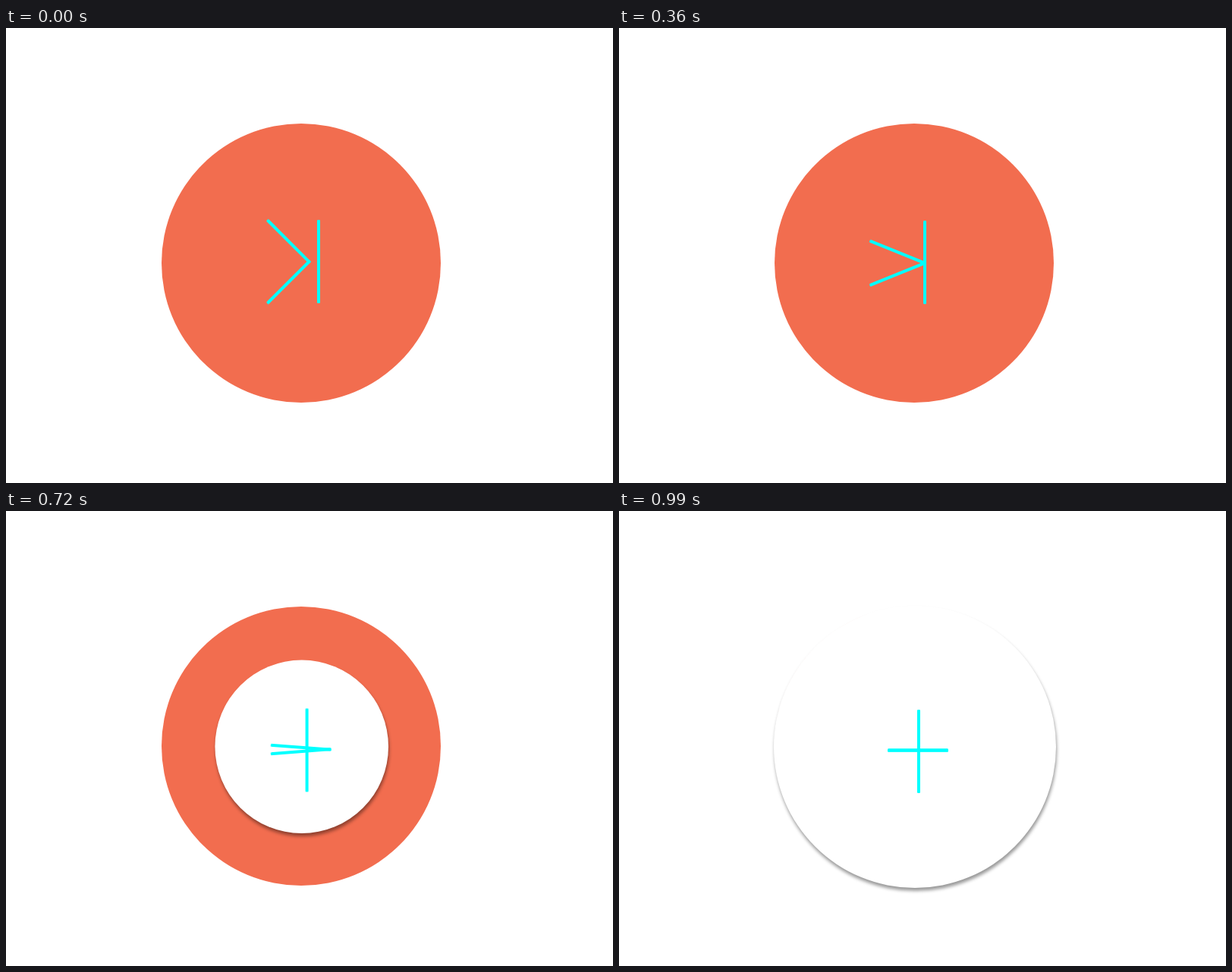
Write an HTML page without scripts that moves like this. It is 800 px wide and 600 px high and loops after 1190 ms.

```html
<!DOCTYPE html>
<html lang="en">
<head>
<meta charset="utf-8">
<title>Icon morph</title>
<style>
  html, body { margin: 0; width: 100%; height: 100%; overflow: hidden; background: #fff; }
  svg { display: block; width: 800px; height: 600px; }

  .icon rect { fill: #0ff; animation: 1190ms infinite both; }
  .icon .bar { animation-name: bar; }
  .icon .upper { animation-name: upper; }
  .icon .lower { animation-name: lower; }

  .lift {
    filter: drop-shadow(1px 4px 2.3px rgba(0, 0, 0, .4));
    animation: show 1190ms infinite step-end;
  }
  .disc { fill: #fff; animation: grow 1190ms infinite; }

  /* The motion ticks every 30 ms: 10 ticks, then 17. */
  @keyframes bar {
    0% { transform: translate(412px, 308px); animation-timing-function: steps(10); }
    25.21% { transform: translate(404.1px, 308px); animation-timing-function: steps(17); }
    68.06%, 100% { transform: translate(395px, 317px); }
  }
  @keyframes upper {
    0% { transform: translate(372.5px, 281.3px) rotate(45deg); animation-timing-function: steps(10); }
    25.21% { transform: translate(363.9px, 293px) rotate(25deg); animation-timing-function: steps(17); }
    68.06%, 100% { transform: translate(394px, 315.8px) rotate(0deg); }
  }
  @keyframes lower {
    0% { transform: translate(372.5px, 335px) rotate(-45deg); animation-timing-function: steps(10); }
    25.21% { transform: translate(363.9px, 325.6px) rotate(-25deg); animation-timing-function: steps(17); }
    68.06%, 100% { transform: translate(394px, 315.3px) rotate(0deg); }
  }
  @keyframes show {
    0% { visibility: hidden; }
    40.3%, 100% { visibility: visible; }
  }
  @keyframes grow {
    0%, 42.85% { r: 58.5px; cx: 389.5px; cy: 310.5px; animation-timing-function: steps(16); }
    83.19%, 100% { r: 186px; cx: 390px; cy: 311px; }
  }
</style>
</head>
<body>
<svg viewBox="0 0 800 600">
  <circle cx="389" cy="310" r="184" fill="#f26d4f"/>
  <g class="lift"><circle class="disc" cx="389.5" cy="310.5" r="58.5"/></g>
  <g class="icon">
    <rect class="upper" x="-40" y="-2" width="80" height="4" rx="1.5"/>
    <rect class="lower" x="-40" y="-2" width="80" height="4" rx="1.5"/>
    <rect class="bar" x="-2" y="-55" width="4" height="110" rx="1.2"/>
  </g>
</svg>
</body>
</html>
```
